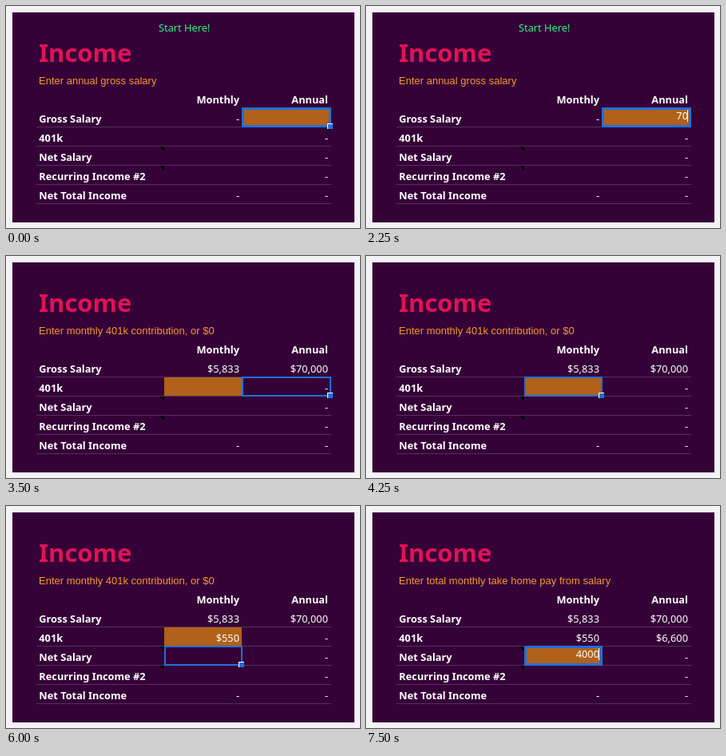
Animation, 443 px wide and 278 px high, one loop 8000 ms. Source, as an HTML page:

```html
<!DOCTYPE html>
<html lang="en">
<head>
<meta charset="utf-8">
<title>Income sheet</title>
<style>
  html, body { margin: 0; width: 100%; height: 100%; overflow: hidden; background: #f3f2f4; }
  svg { display: block; width: 443px; height: 278px; }
  text { font: 12.8px "Noto Sans", "Open Sans", sans-serif; fill: #fff; white-space: pre; }
  .bold { font-weight: 700; }
  .right { text-anchor: end; }
  .title { font-size: 31px; font-weight: 700; fill: #e01255; }
  .start { fill: #2cf480; }
  .prompt { font: 13px "Liberation Sans", Arial, sans-serif; fill: #f7982a; }
</style>
</head>
<body>
<svg id="stage" viewBox="0 0 443 278"></svg>
<script>
const LOOP = 8000;
const ORANGE = '#b1611a', BLUE = '#1f70dc';
// Each column: outer left and right of the selection, right edge of its text
const MONTHLY = { x0: 198, x1: 296, text: 292 };
const ANNUAL = { x0: 295, x1: 407, text: 403 };
const LABELS = ['Gross Salary', '401k', 'Net Salary', 'Recurring Income #2', 'Net Total Income'];
const PROMPTS = [
  'Enter annual gross salary',
  'Enter monthly 401k contribution, or $0',
  'Enter total monthly take home pay from salary'
];

const rowLine = row => 151 + 24 * row;
const rect = (x, y, w, h, fill) => `<rect x="${x}" y="${y}" width="${w}" height="${h}" fill="${fill}"/>`;
const text = (x, y, str, cls = '') => `<text x="${x}" y="${y}" class="${cls}">${str}</text>`;
const value = (col, row, str) => text(col.text, rowLine(row) - 5, str, 'right');
const fill = (col, row) => rect(col.x0, rowLine(row) - 23, col.x1 - col.x0 - 1, 23, ORANGE);

function selection(col, row, thick) {
  const y = rowLine(row) - 24, half = thick / 2;
  return `<rect x="${col.x0 + half}" y="${y + half}" width="${col.x1 - col.x0 - thick}"
    height="${25 - thick}" fill="none" stroke="${BLUE}" stroke-width="${thick}"/>`;
}

function handle(col, row) {
  const x = col.x1 - 5, y = rowLine(row) - 4;
  return rect(x, y, 7, 7, '#fff') + rect(x + 1, y + 1, 6, 6, BLUE);
}

function editor(col, row, str, caret) {
  const y = rowLine(row);
  return text(col.text, y - 9, str, 'right') +
    (caret ? rect(col.x1 - 5, y - 21, 1, 15, '#fff') : '');
}

// Leading characters of str, the first `first` at `start`, then one per 250 ms
const typed = (str, t, start, first) =>
  t < start ? '' : str.slice(0, first + Math.floor((t - start) / 250));

function cursor(t) {
  if (t < 1250) return selection(ANNUAL, 0, 3) + handle(ANNUAL, 0);
  if (t < 3500) {
    const caret = t < 1750 || t >= 2250;
    return selection(ANNUAL, 0, 3) + editor(ANNUAL, 0, typed('70000', t, 2250, 2), caret);
  }
  if (t < 4250) return selection(ANNUAL, 1, 2) + handle(ANNUAL, 1);
  if (t < 5000) return selection(MONTHLY, 1, 2) + handle(MONTHLY, 1);
  if (t < 6000) return selection(MONTHLY, 1, 2) + editor(MONTHLY, 1, typed('550', t, 5000, 1), true);
  if (t < 6750) return selection(MONTHLY, 2, 2) + handle(MONTHLY, 2);
  return selection(MONTHLY, 2, 3) + editor(MONTHLY, 2, typed('4000', t, 6750, 1), true);
}

function scene(t) {
  const step = t < 3500 ? 0 : t < 6250 ? 1 : 2;
  let out = rect(8, 8, 428, 263, '#350238');
  if (step === 0) out += text(191, 32, 'Start Here!', 'start');
  out += text(41, 70, 'Income', 'title') + text(41, 98, PROMPTS[step], 'prompt');
  out += text(MONTHLY.text, 122, 'Monthly', 'bold right') + text(ANNUAL.text, 122, 'Annual', 'bold right');

  LABELS.forEach((label, row) => {
    out += rect(38, rowLine(row), 369, 1, '#54305a') + text(41.3, rowLine(row) - 5, label, 'bold');
  });
  out += fill(step ? MONTHLY : ANNUAL, step);
  for (const y of [176, 200]) out += `<path d="M192 ${y}h6v6z" fill="#000"/>`;

  out += value(MONTHLY, 0, step ? '$5,833' : '-');
  if (step) out += value(ANNUAL, 0, '$70,000');
  if (t >= 6000) out += value(MONTHLY, 1, '$550');
  out += value(ANNUAL, 1, step === 2 ? '$6,600' : '-');
  out += value(ANNUAL, 2, '-') + value(ANNUAL, 3, '-');
  out += value(MONTHLY, 4, '-') + value(ANNUAL, 4, '-');
  return out + cursor(t);
}

const stage = document.getElementById('stage');
let shown = '';
function draw() {
  const next = scene(performance.now() % LOOP);
  if (next !== shown) stage.innerHTML = shown = next;
  requestAnimationFrame(draw);
}
draw();
</script>
</body>
</html>
```
